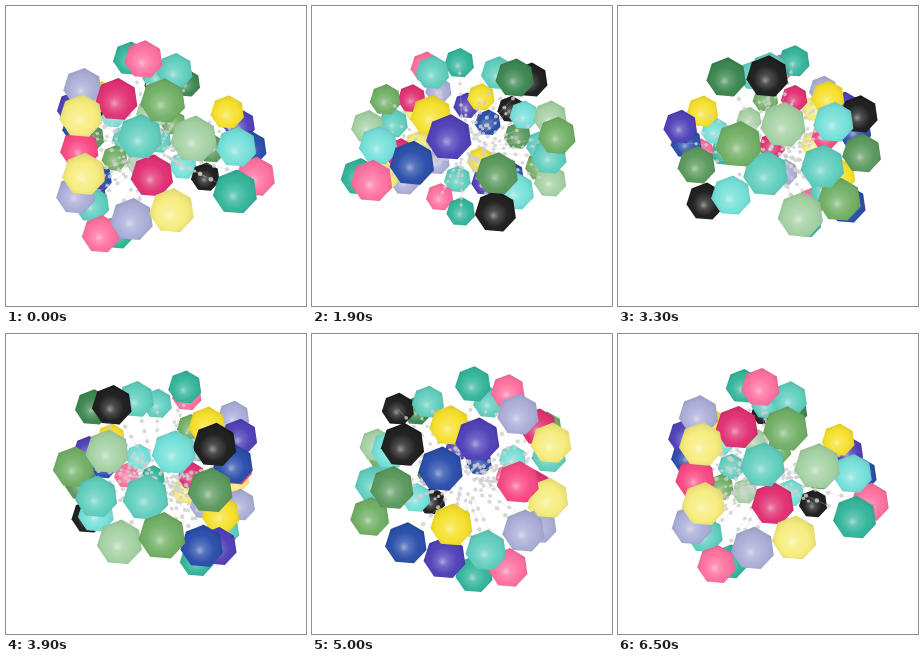
Write an HTML page with a canvas that moves like this. It is 300x300 px and loops after 6600 ms.

```html
<!DOCTYPE html>
<html lang="en">
<head>
<meta charset="utf-8">
<title>Rotating cluster</title>
<style>
  html, body { margin: 0; width: 100%; height: 100%; overflow: hidden; background: #fff; }
  canvas { display: block; width: 300px; height: 300px; }
</style>
</head>
<body>
<canvas id="stage"></canvas>
<script>
const LOOP = 6600, STEP = 100;
const CENTER_X = 151, CENTER_Y = 145, CAMERA = 300, TILT = 0.18;
const BALL_RADIUS = 16, DOT_RADIUS = 1.9, DOTS = 8;

const COLORS = {
  teal: '#2db398', turquoise: '#5bcdbd', cyan: '#70dfd8',
  pink: '#ff6c9d', rose: '#f8437f', crimson: '#e0296f',
  cream: '#f6ec78', yellow: '#f6df24', lavender: '#a8acd7',
  indigo: '#4a3ab6', navy: '#2348a8', black: '#161616',
  forest: '#35824a', moss: '#569658', green: '#6dad60', mint: '#a2d0a1'
};

// color: [distance from the axis, starting angle in degrees, height (down is positive)]
const BALLS = {
  teal: [[28, -68, -91], [40, -73, 76], [98, 36, 16]],
  turquoise: [[83, -8.5, -25], [31, 32, -77.5], [35, 180, -77], [64, -70.5, 46],
    [86.5, 207.5, -2], [83, 178.5, 1.5]],
  cyan: [[86, 48.5, -13.3], [62, 150, 27], [78, 222, -33.5]],
  pink: [[45, -14.5, -86], [63, -50.5, 65], [97, 56.5, 11.6]],
  rose: [[80, -55, -9.5]],
  crimson: [[70, -3, 6.6], [75, -24.5, -52]],
  cream: [[83, 7.5, 28.6], [93, -38, -39.5], [90.5, -38, 5]],
  yellow: [[69, 82.5, -39], [69, 265.5, 23.2], [58, 262, -53.5]],
  lavender: [[74, -15, 39.5], [78, -53.5, -62], [84, -53.5, 27.5]],
  indigo: [[86, 97, -25], [69, 261, 49], [80, 280.5, -43]],
  navy: [[89, 79, -5.5], [79, 238.5, 38.7], [83, 261.5, -21.7]],
  black: [[66, 179, -70], [68, 126, 36.7], [88, 242, -39]],
  forest: [[64, 147, -70]],
  moss: [[75, 124, 4.8], [92, 237.5, -6.7]],
  green: [[83, 3, -51], [92, 215, 23], [91, 166.5, -20.5]],
  mint: [[94, 16, -24.5], [88, 195, 30.7], [85, 187, -34]]
};

const balls = Object.entries(BALLS).flatMap(([name, places]) =>
  places.map(([reach, degrees, height]) =>
    ({ color: COLORS[name], reach, angle: degrees * Math.PI / 180, height })));

const canvas = document.getElementById('stage');
const ctx = canvas.getContext('2d');
const ratio = window.devicePixelRatio || 1;
canvas.width = canvas.height = 300 * ratio;

const heptagon = new Path2D();
for (let i = 0; i < 7; i++) {
  const a = i / 7 * 2 * Math.PI - Math.PI / 2 + 0.08;
  heptagon.lineTo(Math.cos(a) * 1.04, Math.sin(a) * 1.04);
}
heptagon.closePath();

const shade = ctx.createRadialGradient(-0.12, 0.2, 0, 0, 0.05, 1.1);
shade.addColorStop(0, 'rgba(255,255,255,.55)');
shade.addColorStop(0.22, 'rgba(255,255,255,.24)');
shade.addColorStop(0.6, 'rgba(255,255,255,.05)');
shade.addColorStop(1, 'rgba(0,0,0,.12)');

function project(x, y, z) {
  const scale = CAMERA / (CAMERA - z);
  return { x: CENTER_X + x * scale, y: CENTER_Y + (y + z * TILT) * scale, z, scale };
}

function drawBall({ x, y, scale, color }) {
  ctx.save();
  ctx.translate(x, y);
  ctx.scale(BALL_RADIUS * scale, BALL_RADIUS * scale);
  ctx.fillStyle = color;
  ctx.fill(heptagon);
  ctx.fillStyle = shade;
  ctx.fill(heptagon);
  ctx.restore();
}

function drawDot({ x, y, scale, next }) {
  ctx.strokeStyle = 'rgba(205,205,205,.45)';
  ctx.lineWidth = 0.7;
  ctx.beginPath();
  ctx.moveTo(x, y);
  ctx.lineTo(next.x, next.y);
  ctx.stroke();
  ctx.fillStyle = 'rgba(208,208,208,.8)';
  ctx.beginPath();
  ctx.arc(x, y, DOT_RADIUS * scale, 0, 2 * Math.PI);
  ctx.fill();
}

function render(time) {
  const turn = time / LOOP * 2 * Math.PI;
  const items = [];
  for (const { color, reach, angle, height } of balls) {
    const x = reach * Math.sin(angle - turn);
    const z = reach * Math.cos(angle - turn);
    const along = f => project(x * f, height * f, z * f);
    items.push({ ...along(1), color });
    for (let i = 2; i < DOTS; i++) {
      items.push({ ...along(i / DOTS), next: along((i + 1) / DOTS) });
    }
  }
  items.sort((a, b) => a.z - b.z);

  ctx.setTransform(ratio, 0, 0, ratio, 0, 0);
  ctx.fillStyle = '#fff';
  ctx.fillRect(0, 0, 300, 300);
  for (const item of items) item.color ? drawBall(item) : drawDot(item);
}

const start = performance.now();
function tick() {
  const time = (performance.now() - start) % LOOP;
  render(Math.floor(time / STEP) * STEP);
  requestAnimationFrame(tick);
}
tick();
</script>
</body>
</html>
```
